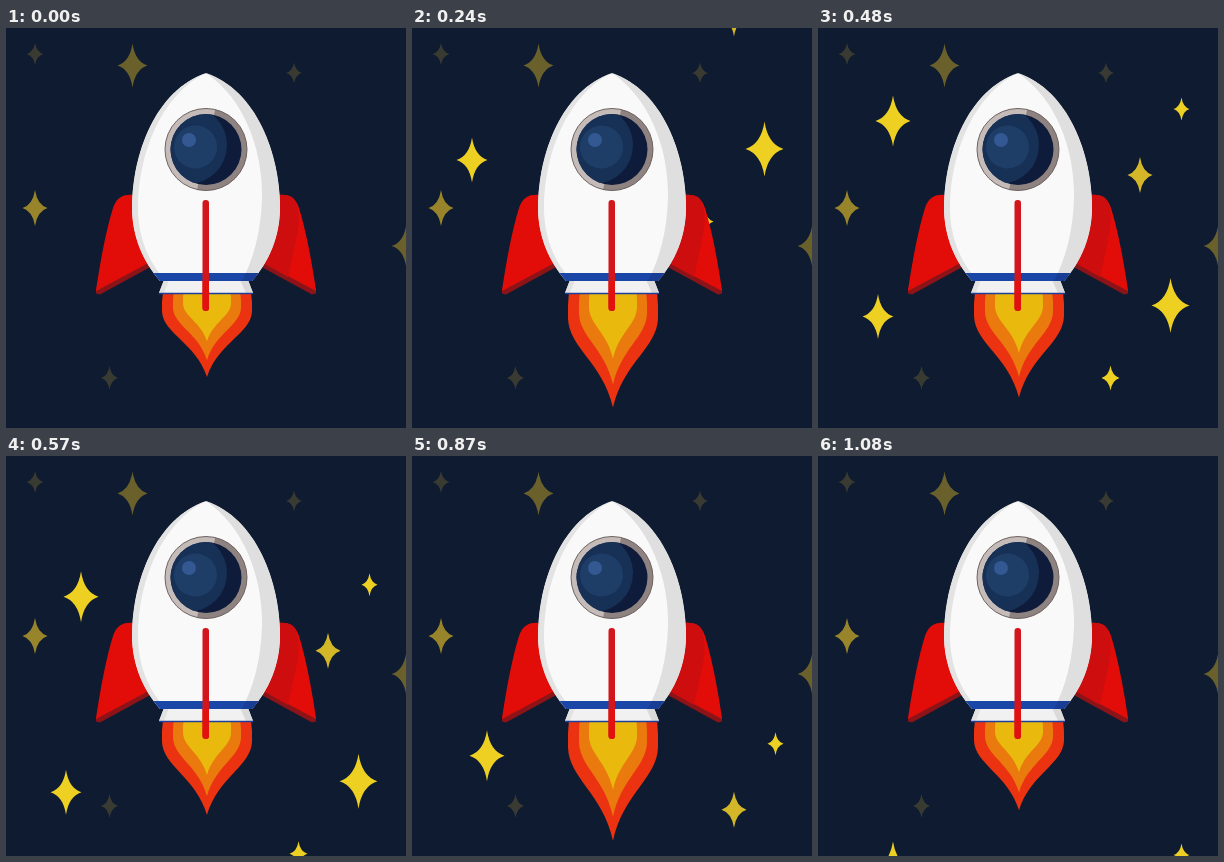
An HTML page that plays this animation: 400 px wide and 400 px high, repeating every 1110 ms.

```html
<!DOCTYPE html>
<html lang="en">
<head>
<meta charset="utf-8">
<title>Rocket</title>
<style>
  html, body { margin: 0; width: 100%; height: 100%; overflow: hidden; background: #0e1b30; }
  svg { display: block; width: 100vw; height: 100vh; }
</style>
</head>
<body>
<svg viewBox="0 0 400 400">
  <defs>
    <path id="hull" d="M200 45C150 62 126 125 126 180C126 208 137 234 154 253H246C263 234 274 208 274 180C274 125 250 62 200 45Z"/>
    <path id="fin" d="M128 167C119 166 111 168 107 180Q98 209 90 262V264L146 234Z"/>
    <clipPath id="inHull"><use href="#hull"/></clipPath>
    <clipPath id="inGlass"><circle cx="200" cy="121.500" r="35.500"/></clipPath>
    <clipPath id="inRing"><circle cx="200" cy="121.500" r="41"/></clipPath>
  </defs>

  <g id="still"></g>
  <g id="moving"></g>

  <!-- fins -->
  <g id="leftFin">
    <use href="#fin" fill="#e20d09"/>
    <path d="M90 263L148 232V237L94 266.500L90 265.500Z" fill="#8c1418"/>
  </g>
  <use href="#leftFin" transform="matrix(-1 0 0 1 400 0)"/>
  <path d="M270 167Q284 166 288 171Q296 186 290 212L282 249L252 232Z" fill="#cd0d0e"/>

  <g id="flame"></g>

  <!-- collar -->
  <path d="M158 252H242L247 265H153Z" fill="#f1f1f1"/>
  <path d="M158 252H163L158 265H153Z" fill="#e2e2e2"/>
  <path d="M234 252H242L247 265H240Z" fill="#dadada"/>
  <path d="M153 265.500H247" stroke="#1c3f9c" stroke-width="1.500"/>

  <!-- hull -->
  <g clip-path="url(#inHull)">
    <use href="#hull" fill="#f9f9f9"/>
    <path d="M200 45C156 66 132 125 132 180C132 208 142 234 160 253H120V45Z" fill="#e3e3e3"/>
    <path d="M200 45C240 72 257 125 256 170C255 205 247 232 236 253H280V45Z" fill="#dfdfdf"/>
    <rect x="120" y="245" width="160" height="8" fill="#1a46a8"/>
    <path d="M240 245H280V253H236Z" fill="#173d95"/>
  </g>

  <!-- porthole -->
  <circle cx="200" cy="121.500" r="41" fill="#c5bbb9"/>
  <path d="M210 78H245V166H190Z" fill="#8f8381" clip-path="url(#inRing)"/>
  <circle cx="200" cy="121.500" r="41" fill="none" stroke="#6d6361"/>
  <g clip-path="url(#inGlass)">
    <rect x="160" y="80" width="80" height="84" fill="#0e1b3b"/>
    <circle cx="182" cy="117" r="39" fill="#173156"/>
    <circle cx="189.500" cy="119" r="21.500" fill="#1e3e68"/>
    <circle cx="183" cy="112" r="7" fill="#335892"/>
  </g>

  <!-- centre fin -->
  <rect x="196.500" y="172" width="6.500" height="111" rx="3" fill="#d3161b"/>
  <path d="M196.500 253H203V280Q203 283 200 283Q196.500 283 196.500 280Z" fill="#e0110f"/>
</svg>
<script>
  const LOOP = 1110, STEP = 30;
  const el = id => document.getElementById(id);

  // Four-pointed star: centre, half width, half height, colour
  const star = ([x, y, w, h, color]) => {
    const a = w * .18, b = h * .18;
    return `<path transform="translate(${x} ${y})" fill="${color}"
      d="M0 ${-h}Q${a} ${-b} ${w} 0Q${a} ${b} 0 ${h}Q${-a} ${b} ${-w} 0Q${-a} ${-b} 0 ${-h}Z"/>`;
  };

  const DIM = '#393a31', OLIVE = '#6a602c', GOLD = '#eed023';
  el('still').innerHTML = [
    [29, 26, 8.5, 11, DIM], [288, 45, 8, 10.5, DIM], [103.5, 350, 8.5, 12, DIM],
    [126.5, 37.5, 15, 22, OLIVE], [400, 218, 14.5, 20, OLIVE],
    [29, 180, 12.5, 18, '#98842a']
  ].map(star).join('');
  el('moving').innerHTML = [
    [60, 241.5, 15.5, 22.5, GOLD], [352.5, 230.5, 19, 27.5, GOLD],
    [75, 46, 17.5, 25.5, GOLD], [322, 100, 12.5, 18, '#d4b728'],
    [363.5, 34, 8, 11.5, GOLD], [292.5, 303, 9, 12.5, GOLD]
  ].map(star).join('');

  const layers = [['#ec3311', 45, 1], ['#ea7a0e', 34, .8], ['#e9b90e', 24, .575]]
    .map(([color, half, scale]) => {
      const path = document.createElementNS('http://www.w3.org/2000/svg', 'path');
      path.setAttribute('fill', color);
      el('flame').append(path);
      return { path, half, scale };
    });

  // Time and height of the flame tip
  const tipKeys = [[0, 349], [315, 389], [655, 349], [890, 388], [LOOP, 349]];
  const tipAt = t => {
    const i = tipKeys.findIndex(key => key[0] > t);
    const [t0, y0] = tipKeys[i - 1], [t1, y1] = tipKeys[i];
    return y0 + (y1 - y0) * (t - t0) / (t1 - t0);
  };

  // Stars rush in, then fall steadily
  const driftAt = t => t < 315 ? -40.5 + .92 * (t - 315) : .53 * (t - 390) - .7;

  function draw(now) {
    const t = Math.floor(now % LOOP / STEP) * STEP;
    el('moving').setAttribute('transform', `translate(0 ${driftAt(t)})`);
    const length = tipAt(t) - 265;
    for (const { path, half, scale } of layers) {
      const y = part => 265 + length * scale * part;
      const x = part => 201 + half * part;
      path.setAttribute('d', `M${x(-.98)} 265Q${x(-1.01)} ${y(.1)} ${x(-1)} ${y(.22)}
        C${x(-.98)} ${y(.48)} ${x(-.24)} ${y(.6)} 201 ${y(1)}
        C${x(.24)} ${y(.6)} ${x(.98)} ${y(.48)} ${x(1)} ${y(.22)}Q${x(1.01)} ${y(.1)} ${x(.98)} 265Z`);
    }
    requestAnimationFrame(() => draw(performance.now() - start));
  }

  const start = performance.now();
  draw(0);
</script>
</body>
</html>
```
